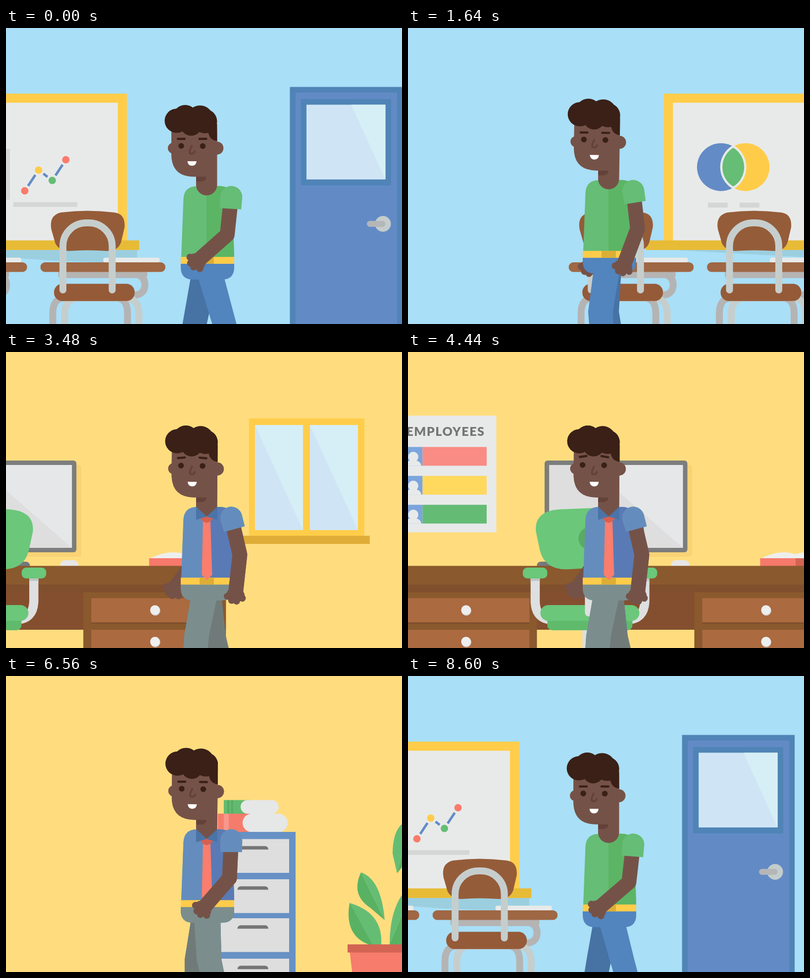
Recreate the animation shown at these times as an HTML page. Size 800 by 600 pixels, loop 8.64 s.

```html
<!DOCTYPE html>
<html lang="en">
<head>
<meta charset="utf-8">
<title>From class to office</title>
<style>
html, body { margin: 0; width: 100%; height: 100%; overflow: hidden; background: #a9dff7; }
svg { display: block; width: 800px; height: 600px; }
</style>
</head>
<body>
<svg id="stage" viewBox="0 0 800 600" xmlns="http://www.w3.org/2000/svg"></svg>
<script>
const LOOP = 8640, STRIDE = 960, WIPE_SPEED = 1.35;
const stage = document.getElementById('stage');

// Shape helpers
const box = (x, y, x2, y2, fill, r = 0) =>
  `<rect x="${x}" y="${y}" width="${x2 - x}" height="${y2 - y}" rx="${r}" fill="${fill}"/>`;
const dot = (x, y, r, fill) => `<circle cx="${x}" cy="${y}" r="${r}" fill="${fill}"/>`;
const shape = (d, fill) => `<path d="${d}" fill="${fill}"/>`;
const line = (d, color, width, cap = 'butt') =>
  `<path d="${d}" fill="none" stroke="${color}" stroke-width="${width}" stroke-linecap="${cap}" stroke-linejoin="round"/>`;
const group = (content, attrs = '') => `<g ${attrs}>${content}</g>`;
const move = (x, y) => `transform="translate(${x} ${y})"`;
const repeat = (list, draw) => list.map(draw).join('');

// Classroom
function whiteboard() {
  const paper = '#e8eae9', rule = '#d5d6d6', ink = '#638bc6';
  const points = [[494, 330, '#f97b6c'], [522, 288, '#ffcc4a'], [549.5, 309, '#65bd76'], [577, 267, '#f97b6c']];
  const links = repeat(points.slice(1), ([x, y], i) => {
    const [px, py] = points[i], len = Math.hypot(x - px, y - py);
    const k = 12 / len, dx = (x - px) * k, dy = (y - py) * k;
    return line(`M${px + dx} ${py + dy} L${x - dx} ${y - dy}`, ink, 5);
  });
  return shape('M180 450 L487 467 Q600 476 721 476 V450Z', '#9bcfe0') +
    box(159, 133, 700.5, 432, '#ffcd4a') + box(177.5, 151.5, 682, 431, paper) +
    box(122.5, 430.5, 725, 450, '#e8bb37') +
    dot(274.5, 282, 48.5, ink) + dot(324, 282, 48.5, '#ffcc4a') +
    `<path d="M299.3 240 A48.5 48.5 0 0 1 299.3 324 A48.5 48.5 0 0 1 299.3 240Z" fill="#65bd76" stroke="${paper}" stroke-width="4.5"/>` +
    box(248, 354, 288, 364, rule) + box(312, 354, 352, 364, rule) +
    box(454.5, 245, 464, 348, rule) + box(471, 353, 600, 362.5, rule) +
    links + repeat(points, ([x, y, c]) => dot(x, y, 7.5, c));
}

function schoolDesk() {
  const steel = '#b5b4b4', pale = '#c6cecd';
  return shape('M110 374 Q164 367 219 374 Q241 377 239 404 L232 434 Q226 452 204 452 Q164 449 126 452 Q106 451 99 436 L91 408 Q86 380 110 374Z', '#955c39') +
    box(105, 490, 285, 507, steel, 6) + line('M266 500 Q281 506 280 522 Q279 541 256 542', steel, 14) +
    line('M94 610 V578 Q94 546 122 546 H217 Q245 546 245 578 V610', steel, 14) +
    line('M118 610 V580 Q118 547 146 547 H240 Q268 547 268 580 V610', pale, 14) +
    box(196, 465.5, 310, 476, '#e8eaea', 4.5) + box(69, 475, 321.5, 494.5, '#9f6744', 9.5) +
    box(96.5, 518.5, 259.5, 553.5, '#955a38', 17) +
    line('M114.5 531 V442 A47 47 0 0 1 161.5 395 H167 A47 47 0 0 1 214 442 V531', pale, 14, 'round');
}

function door() {
  const frame = '#5084b6';
  return box(573, 119.5, 800.5, 610, frame) + box(584.5, 131, 789.5, 610, '#628bc6') +
    box(595, 144, 777.5, 319, frame) + box(606.5, 155.5, 766, 307, '#cfe5f5') +
    shape('M697 155.5 H766 V307Z', '#d6eff6') +
    dot(761, 397, 16, '#c4cccc') + box(728.5, 391, 766, 403, '#b4b6b8', 6);
}

// Office
function officeWindow() {
  return box(15, 134.5, 248, 374, '#ffcd4a') +
    repeat([27, 138], x => box(x, 148, x + 97, 361, '#cfe5f5') + shape(`M${x} 148 h97 v213Z`, '#d6eef6')) +
    box(1.5, 372.5, 259, 389, '#dfac37');
}

function poster() {
  const paper = '#e8eaea';
  return box(-27.5, 129, 178, 365.5, paper) +
    `<text x="75.5" y="170" text-anchor="middle" font-family="Lato, sans-serif" font-weight="900" font-size="25" letter-spacing="1.5" fill="#757575">EMPLOYEES</text>` +
    repeat(['#f98c84', '#ffd95e', '#64bc74'], (c, i) => {
      const y = 192.5 + 58.6 * i;
      return box(-9, y, 29, y + 38, '#7ba5dc') + box(29, y, 158.5, y + 38, c) +
        dot(10.2, y + 20, 10.3, paper) +
        shape(`M-6 ${y + 38} Q-4 ${y + 27} 10.2 ${y + 27} Q24.5 ${y + 27} 26.5 ${y + 38}Z`, paper);
    });
}

function officeDesk() {
  const wood = '#8a592d', shade = '#804f2e';
  const cupboard = x => box(x, 487, x + 288, 610, wood) +
    repeat([499, 563], y => box(x + 16, y, x + 273, y + 52, shade) + box(x + 16, y, x + 273, y + 49, '#ab6a40') +
      dot(x + 145.5, y + 25.5, 10, '#c9c7c5') + dot(x + 144.8, y + 24, 9.8, '#eeeeee'));
  return box(283, 229, 574, 415, '#fad376', 6) +
    box(395, 400, 445, 434, '#6c6d6d') + box(275.5, 220, 564, 406, '#7c7d7c', 6) +
    box(285, 229, 555, 397, '#e6e7e8') + shape('M285 229 H363 L555 397 H285Z', '#dedede') +
    box(260, 425, 470, 440, '#76787a', 8) + box(531, 422, 568, 442, '#e6e7e7', 10) +
    shape('M711 419 Q752 399 782 410 Q812 399 853 419Z', '#eeeeee') +
    box(711, 418, 782, 434, '#f6796c') + box(782, 418, 853, 434, '#d36453') +
    box(-28, 471, 866, 563, '#844f2f') + box(-28, 471, 866, 488, shade) +
    cupboard(-28) + cupboard(578) + box(-54, 433.5, 892, 471.5, wood);
}

function officeChair() {
  const green = '#6bc77a', white = '#dedfe0';
  return line('M256.5 450 V505 Q257 542 292 543 M478 450 V505 Q477 542 442 543', white, 18.5) +
    box(247, 455, 266, 464, '#bfc3c5') + box(469, 455, 487.5, 464, '#bfc3c5') +
    box(352, 560, 382, 610, white) +
    shape('M367 316.5 L305 319 Q254 323 258 364 L266 402 Q276 442 322 440.5 L367 438 L412 440.5 Q458 442 468 402 L476 364 Q480 323 429 319Z', green) +
    dot(367, 378, 23, '#59ab63') +
    box(281, 530, 453, 564, '#60ba6c', 10) + box(267, 513, 467, 545, green, 16) +
    box(357, 400, 377, 536, white, 8) +
    box(231.5, 437, 281, 459, green, 9) + box(453.5, 437, 503, 459, green, 9);
}

function cabinet() {
  return box(55, 279, 125, 316.5, '#f57c6c') + box(67, 279, 77, 316.5, '#f8978c') +
    box(105, 279, 196, 316.5, '#e6e7e7', 18.5) +
    box(67, 251.5, 120, 279, '#62ba70') + box(74, 251.5, 78, 279, '#58ab63') + box(82, 251.5, 85.5, 279, '#58ab63') +
    box(101, 251.5, 178, 279, '#e6e7e7', 13.7) + box(39, 316, 212, 610, '#6791c5') +
    repeat([330.5, 412, 491, 573], y => box(52, y, 199, y + 68.5, '#dedede') +
      shape(`M94.5 ${y + 21.3} Q95 ${y + 14.3} 102 ${y + 14.3} H150 Q156.5 ${y + 14.3} 157 ${y + 21.3}Z`, '#757575'));
}

function plant() {
  const leaf = (x, y, bx, by, l, r) =>
    shape(`M${x} ${y} Q${l} ${by} ${bx} ${by}Z`, '#59b163') + shape(`M${x} ${y} Q${r} ${y} ${bx} ${by}Z`, '#65bd74') ;
  return shape('M449 290 Q411 299 411 360 L420 400 L433 350Z', '#65bd74') +
    shape('M449 290 Q465 332 440 375 L420 400Z', '#59b163') +
    shape('M347 398 Q326 444 366 470 L395 495Z', '#59b163') + shape('M347 398 Q388 412 395 495Z', '#65bd74') +
    shape('M460 414 Q405 450 405 544Z', '#65bd74') + shape('M460 414 Q466 510 440 544 H405Z', '#59b163') +
    shape('M324 460 Q313 525 362 544 H388Z', '#59b163') + shape('M324 460 Q392 480 388 544 H370Z', '#65bd74') +
    shape('M324 556 H460 L453 615 H331Z', '#f77c6c') + box(320, 544, 464.5, 560.5, '#d36453');
}

// Walker, built once per outfit
const SKIN = '#755248', DARK_SKIN = '#64423a', HAIR = '#3a2017';

function arm(name) {
  const knuckles = [[-16, 86.5], [-6.3, 93.5], [3.7, 94], [14.5, 87]];
  const fist = `<ellipse cy="82" rx="18.5" ry="14" fill="${SKIN}"/>` + repeat(knuckles, ([x, y]) => dot(x, y, 7, SKIN));
  return line('', SKIN, 30).replace('<path', `<path class="${name}-limb"`) + group(fist, `class="${name}-hand"`);
}

function head() {
  return dot(338, 243.5, 11, SKIN) + dot(426, 243.5, 13.3, SKIN) +
    shape('M334 195 V255 Q334 301.5 380 301.5 H384 V318 A21.2 21.2 0 0 0 426.5 318 V195Z', SKIN) +
    shape('M384 301.5 H405 Q404 311 393 311 H384Z', DARK_SKIN) +
    dot(345, 188, 24.5, HAIR) + dot(362, 181.5, 25.5, HAIR) + dot(392, 184, 27, HAIR) +
    dot(402, 189, 24.4, HAIR) + dot(374, 197, 21.5, HAIR) +
    shape('M426 184 L426.5 229 Q408 227 408 204Z', HAIR) +
    group(dot(354, 239, 5.8, HAIR) + dot(397.5, 239.3, 5.8, HAIR), 'class="eyes"') +
    group(box(-9, -2.2, 9, 2.2, HAIR, 2), 'class="brow-l"') + group(box(-9, -2.2, 9, 2.2, HAIR, 2), 'class="brow-r"') +
    line('M375 239 Q368 254 373 254.5 Q380 255.5 381 250', DARK_SKIN, 4, 'round') +
    shape('M366.5 270 H385 Q384 279.3 375.7 279.3 Q367.5 279.3 366.5 270Z', '#fff');
}

function walker(c) {
  const belt = box(353, 464, 461, 478, '#ffcc4a') + box(391, 464, 420, 478, '#dcae36');
  const collar = c.collar ? shape('M384 320 V347 L405.5 340 L427 347 V320 L405.5 340Z', c.collar) +
    '<path class="tie" fill="#fa7d6d"/>' + shape('M392.5 344 L405.5 340 L418.5 344 L413 350 L405.5 353 L398 350Z', '#d8604f') : '';
  return arm('back') + `<path class="back-leg" fill="${c.legShade}"/><path class="front-leg" fill="${c.leg}"/>` +
    group(
      shape('M353 476 H461 V485 Q461 510 436 510 H378 Q353 510 353 485Z', c.leg) +
      shape('M354 465 L358.5 346 Q360 321 386 320.5 H432 Q457 321 457.5 346 L461 465Z', c.top) +
      shape('M405 320.5 H432 Q457 321 457.5 346 L461 465 H405Z', c.topShade) +
      belt + group(head(), 'class="head"') + collar, 'class="body"') +
    arm('front') + group(shape('M-22.3 0 A22.3 22.3 0 0 1 22.3 0 L21.7 24 H-21.7Z', c.top), 'class="sleeve"');
}

const student = { top: '#65bd76', topShade: '#5cb565', leg: '#5284be', legShade: '#4672a4' };
const employee = { top: '#648dbd', topShade: '#5a7ab5', leg: '#7b8e8d', legShade: '#707b79', collar: '#4a74a8' };

// Scenery: markup, the time at which its coordinates hold, scroll speed in px/ms
const scenery = [
  [officeWindow(), 2400, 0.4402],
  [poster() + officeDesk() + officeChair(), 4440, 0.4398],
  [plant(), 5720, 0.44],
  [cabinet(), 5720, 0.4435],
  [whiteboard() + repeat([0, 1, 2], i => group(schoolDesk(), move(456.6 - 279.4 * i, 0))) +
    group(door(), move(456.6, 0)), 920, 0.4963, true],
];

stage.innerHTML = `<defs><clipPath id="office"><rect class="wipe" height="600"/></clipPath></defs>` +
  box(0, 0, 800, 600, '#a9dff7') + '<rect class="wipe" height="600" fill="#ffdd7e"/>' +
  repeat(scenery, ([markup]) => group(markup, 'class="scenery"')) +
  group(walker(student), 'class="walker"') +
  group(group(walker(employee), 'class="walker"'), 'clip-path="url(#office)"');

const all = name => stage.querySelectorAll('.' + name);
const set = (name, attr, value) => all(name).forEach(el => el.setAttribute(attr, value));
const TAU = Math.PI * 2, DEG = 180 / Math.PI;
const clamp = (v, lo, hi) => Math.min(hi, Math.max(lo, v));

function poseArm(name, x, y, phase) {
  const swing = -Math.cos(TAU * (phase + 0.04));
  const upper = 6.5 + 13 * swing, fore = -20.7 + 28.6 * swing;
  const reach = (angle, len) => [Math.sin(angle / DEG) * len, Math.cos(angle / DEG) * len];
  const [ux, uy] = reach(upper, 77), [fx, fy] = reach(fore, 78);
  const ex = x + ux, ey = y + uy;
  set(name + '-limb', 'd', `M${x} ${y} L${ex} ${ey} l${fx} ${fy}`);
  set(name + '-hand', 'transform', `translate(${ex} ${ey}) rotate(${-fore})`);
  if (name === 'front') set('sleeve', 'transform', `translate(${x} ${y}) rotate(${-upper - 2.5})`);
}

function poseLeg(name, hipY, phase) {
  const hip = 405.5;
  const knee = 402 + 24 * Math.cos(TAU * phase) + 8 * Math.cos(2 * TAU * phase);
  const shin = knee + (knee - hip) * 0.25 + 3 * (1 - Math.cos(2 * TAU * phase));
  const low = knee + (shin - knee) * 1.6;
  set(name + '-leg', 'd', `M${hip - 27} ${hipY} H${hip + 27} L${knee + 25} 575 L${low + 24.3} 615 H${low - 24.3} L${knee - 25} 575Z`);
}

function render(t) {
  const phase = (t / STRIDE) % 1;
  const bob = -6.5 * (1 - Math.cos(2 * TAU * phase));

  all('scenery').forEach((el, i) => {
    const [, ref, speed, wraps] = scenery[i];
    const time = wraps && t > 5000 ? t - LOOP : t;
    el.setAttribute('transform', `translate(${(time - ref) * speed} 0)`);
  });

  const entering = t < 4500;
  const edge = clamp(entering ? 783 + WIPE_SPEED * (t - 2400) : 790 + WIPE_SPEED * (t - 7400), 0, 800);
  set('wipe', 'x', entering ? 0 : edge);
  set('wipe', 'width', entering ? edge : 800 - edge);

  poseArm('back', 387, 344 + bob, phase + 0.5);
  poseArm('front', 455, 342.5 + bob, phase);
  poseLeg('front', 475 + bob, phase);
  poseLeg('back', 475 + bob, phase + 0.5);
  set('body', 'transform', `translate(0 ${bob})`);
  set('head', 'transform', `rotate(${-bob / 13} 405 320)`);

  const worry = clamp(1 - Math.abs(t - 4440) / 2200, 0, 1);
  set('eyes', 'transform', `translate(${-2 * worry} ${-3 * worry})`);
  set('brow-l', 'transform', `translate(${354 - worry} ${224.8 - 6 * worry}) rotate(${-9 * worry})`);
  set('brow-r', 'transform', `translate(${397.7 - worry} ${224.8 - 6 * worry}) rotate(${9 * worry})`);

  const drop = clamp((t - 2050) / 550, 0, 1);
  const tip = 350 + 119 * drop * drop * (3 - 2 * drop) + 2 * (1 - drop);
  const side = Math.max(350, tip - 11);
  set('tie', 'd', `M398 349 H413 L416.5 ${side} L406 ${tip} L395.5 ${side}Z`);
}

const start = performance.now();
function tick() {
  render((performance.now() - start) % LOOP);
  requestAnimationFrame(tick);
}
render(0);
requestAnimationFrame(tick);
</script>
</body>
</html>
```
